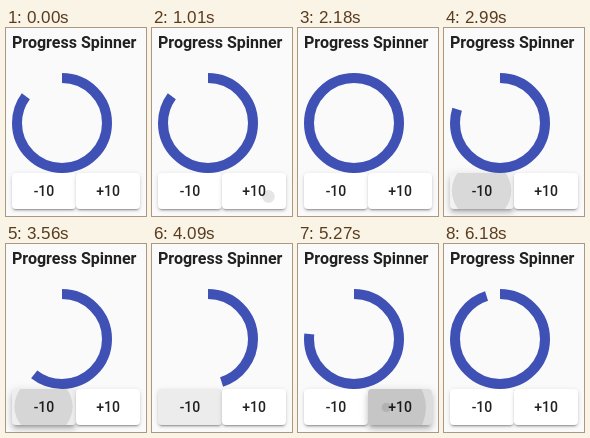
An HTML page for the animation above (6510 ms loop, 140 px wide and 188 px high).

```html
<!DOCTYPE html>
<html lang="en">
<head>
<meta charset="utf-8">
<title>Progress Spinner</title>
<style>
  html, body {
    margin: 0;
    width: 100%;
    height: 100%;
    overflow: hidden;
    background: #fafafa;
    color: rgba(0, 0, 0, .87);
    font-family: Roboto, Arial, sans-serif;
  }
  h3 {
    position: absolute;
    left: 6px;
    top: 0;
    margin: 0;
    font: 700 16px/29px Roboto, Arial, sans-serif;
    white-space: nowrap;
  }
  svg {
    position: absolute;
    left: 6px;
    top: 45px;
    width: 100px;
    height: 100px;
  }
  circle {
    fill: none;
    stroke: #3f51b5;
    stroke-width: 10;
  }
  .btn {
    position: absolute;
    top: 145px;
    width: 64px;
    height: 36px;
    border-radius: 4px;
    background: #fff;
    font-size: 14px;
    font-weight: 500;
    line-height: 36px;
    text-align: center;
  }
  #minus { left: 6px; }
  #plus { left: 70px; }
  .clip {
    position: absolute;
    inset: 0;
    overflow: hidden;
    border-radius: 4px;
  }
  .ripple {
    position: absolute;
    border-radius: 50%;
    background: rgba(0, 0, 0, .1);
  }
</style>
</head>
<body>
<h3>Progress Spinner</h3>
<svg viewBox="0 0 100 100">
  <circle id="arc" cx="50" cy="50" r="45" transform="rotate(-90 50 50)"/>
</svg>
<div class="btn" id="minus">-10<div class="clip"></div></div>
<div class="btn" id="plus">+10<div class="clip"></div></div>
<script>
const LOOP = 6510, START = 85;
const HOLD = 20, MOVE = 500, ENTER = 450, EXIT = 400;
const LEN = 2 * Math.PI * 45;

const $ = id => document.getElementById(id);
const clamp = (v, lo, hi) => Math.max(lo, Math.min(hi, v));

// CSS-style cubic-bezier easing
function bezier(x1, y1, x2, y2) {
  const at = (a, b, s) => 3 * (1 - s) * (1 - s) * s * a + 3 * (1 - s) * s * s * b + s * s * s;
  return x => {
    if (x <= 0) return 0;
    if (x >= 1) return 1;
    let lo = 0, hi = 1;
    for (let i = 0; i < 24; i++) {
      const mid = (lo + hi) / 2;
      if (at(x1, x2, mid) < x) lo = mid; else hi = mid;
    }
    return at(y1, y2, lo);
  };
}
const arcEase = bezier(.35, 0, .25, 1);
const rippleEase = bezier(0, 0, .2, 1);
const shadowEase = bezier(.4, 0, .2, 1);

// Mouse presses: button, pointer position inside it, times
const presses = [
  ['plus', 46, 23, [996, 1170]],
  ['minus', 32, 18, [2180, 2460, 2780, 3060, 3360, 3600]],
  ['plus', 18, 18, [4450, 4710, 4890, 5070, 5260]]
].flatMap(([id, x, y, times]) => times.map(time => ({ id, x, y, time })));

// Each click restarts the arc transition from wherever it is
const moves = [];
function valueAt(t) {
  let m = null;
  for (const k of moves) if (k.time <= t) m = k;
  return m ? m.from + (m.to - m.from) * arcEase((t - m.time) / MOVE) : START;
}
let count = START;
for (const p of presses) {
  count += p.id === 'plus' ? 10 : -10;
  const time = p.time + HOLD;
  moves.push({ time, from: valueAt(time), to: clamp(count, 0, 100) });

  const r = Math.hypot(Math.max(p.x, 64 - p.x), Math.max(p.y, 36 - p.y));
  p.el = document.createElement('div');
  p.el.className = 'ripple';
  Object.assign(p.el.style, {
    left: p.x - r + 'px',
    top: p.y - r + 'px',
    width: 2 * r + 'px',
    height: 2 * r + 'px'
  });
  document.querySelector('#' + p.id + ' .clip').append(p.el);
}

// y, blur, spread, alpha of each shadow layer, resting and pressed
const LOW = [[3, 1, -2, .2], [2, 2, 0, .14], [1, 5, 0, .12]];
const HIGH = [[5, 5, -3, .2], [8, 10, 1, .14], [3, 14, 2, .12]];
const shadow = k => LOW.map((low, i) => {
  const [y, blur, spread, a] = low.map((v, j) => v + (HIGH[i][j] - v) * k);
  return `0 ${y}px ${blur}px ${spread}px rgba(0,0,0,${a})`;
}).join();

function lift(age) {
  if (age < 0) return 0;
  return .6 * (age < 120 ? shadowEase(age / 120) : 1 - shadowEase((age - 120) / 280));
}

function draw(t) {
  const part = valueAt(t) / 100;
  $('arc').setAttribute('stroke-dasharray', part > .9995 ? 'none' : `${part * LEN} ${LEN}`);

  const raised = { minus: 0, plus: 0 };
  for (const p of presses) {
    const age = t - p.time;
    const shown = age >= 0 && age < ENTER + EXIT;
    p.el.style.display = shown ? 'block' : 'none';
    raised[p.id] = Math.max(raised[p.id], lift(age));
    if (!shown) continue;
    p.el.style.transform = `scale(${rippleEase(age / ENTER)})`;
    p.el.style.opacity = 1 - rippleEase((age - ENTER) / EXIT);
  }
  for (const id in raised) $(id).style.boxShadow = shadow(raised[id]);
}

const begin = performance.now();
function tick() {
  draw((performance.now() - begin) % LOOP);
  requestAnimationFrame(tick);
}
tick();
</script>
</body>
</html>
```
